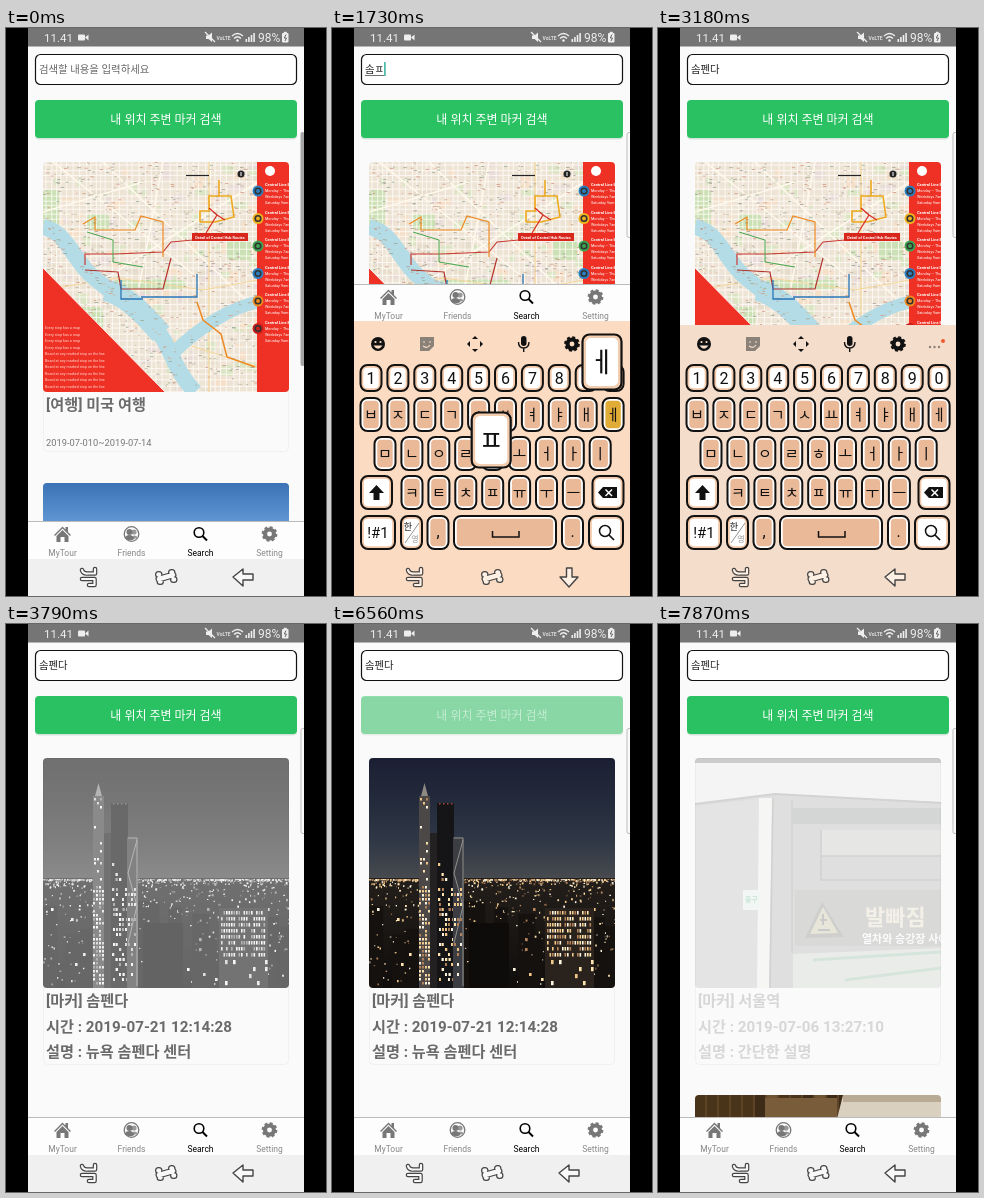
These frames come from a looping animation (320x568 px, 8000 ms). An HTML page with a canvas:

```html
<!DOCTYPE html>
<html lang="ko">
<head>
<meta charset="utf-8">
<title>Marker search</title>
<style>
html, body { margin: 0; width: 100%; height: 100%; overflow: hidden; background: #000; }
canvas { display: block; }
</style>
</head>
<body>
<canvas id="stage" width="320" height="568"></canvas>
<script>
const screenCtx = document.getElementById('stage').getContext('2d');
const FONT = 'Roboto, "Noto Sans CJK KR", "Noto Sans CJK", sans-serif';
const PAGE = '#fafafa', GREEN = '#2ac162', PEACH = '#fbdcc3', TAN = '#e9b998';
const PLACE = '솜펜다';
let g = screenCtx;

const STEPS = [0, 420, 530, 640, 740, 840, 950, 1210, 1310, 1420, 1520, 1620, 1730, 1850, 1950,
  2050, 2150, 2260, 2600, 2780, 3070, 3180, 3290, 3390, 3490, 3590, 3690, 3790, 3890, 3990,
  4600, 6560, 6660, 6760, 6860, 7370, 7470, 7570, 7670, 7770, 7870];

// Time, key pressed, text already in the field
const TYPING = [[1210, 'ㅅ', ''], [1310, 'ㅗ', 'ㅅ'], [1420, '', '소'], [1520, 'ㅁ', '소'],
  [1620, 'ㅍ', '솜'], [1730, 'ㅔ', '솜ㅍ'], [1850, '', '솜페'], [1950, 'ㄴ', '솜페'],
  [2050, 'ㄷ', '솜펜'], [2150, 'ㅏ', '솜펜ㄷ'], [2260, '', PLACE]];

// Value of the last [time, value] pair that has begun
const at = (t, pairs) => pairs.filter(p => p[0] <= t).pop()[1];

function seeded(seed) {
  return () => (seed = (seed * 16807) % 2147483647) / 2147483647;
}
function roundPath(x, y, w, h, r) {
  g.beginPath();
  g.roundRect(x, y, w, h, r);
}
function box(x, y, w, h, color, r = 0) {
  roundPath(x, y, w, h, r);
  g.fillStyle = color;
  g.fill();
}
function frame(x, y, w, h, color, r = 0, width = 1) {
  roundPath(x, y, w, h, r);
  g.strokeStyle = color;
  g.lineWidth = width;
  g.stroke();
}
function disc(x, y, r, color) {
  g.beginPath();
  g.arc(x, y, r, 0, 7);
  g.fillStyle = color;
  g.fill();
}
function ring(x, y, r, color, width, dash = []) {
  g.beginPath();
  g.arc(x, y, r, 0, 2 * Math.PI);
  g.strokeStyle = color;
  g.lineWidth = width;
  g.setLineDash(dash);
  g.stroke();
  g.setLineDash([]);
}
function fill(d, color) {
  g.fillStyle = color;
  g.fill(new Path2D(d));
}
function line(d, color, width = 1) {
  g.strokeStyle = color;
  g.lineWidth = width;
  g.stroke(new Path2D(d));
}
function label(text, x, y, size, color, align = 'left', weight = 400) {
  g.font = `${weight} ${size}px ${FONT}`;
  g.textAlign = align;
  g.fillStyle = color;
  g.fillText(text, x, y);
}
function gradient(h, ...colors) {
  const shade = g.createLinearGradient(0, 0, 0, h);
  colors.forEach((color, i) => shade.addColorStop(i / (colors.length - 1), color));
  return shade;
}
function gear(x, y, r, color) {
  ring(x, y, r * .6, color, r * .55);
  ring(x, y, r * .88, color, r * .34, [r * .38, r * .311]);
}

function photo(paint) {
  const canvas = document.createElement('canvas');
  canvas.width = 246;
  canvas.height = 230;
  g = canvas.getContext('2d');
  paint(seeded(77));
  g = screenCtx;
  return canvas;
}

const cityMap = photo(rnd => {
  box(0, 0, 246, 230, '#eee4d6');
  for (let i = 0; i < 220; i++)
    box(rnd() * 215, rnd() * 230, 4 + rnd() * 10, 3 + rnd() * 8,
      ['#e6dccb', '#f5dfc8', '#dbe5c4', '#e9dcd8'][i % 4]);
  for (const [x, y, w, h] of [[0, 28, 16, 36], [44, 52, 22, 16], [70, 118, 72, 9], [184, 78, 24, 20], [20, 145, 40, 30]])
    box(x, y, w, h, '#cbe0b4', 4);
  for (let x = 3; x < 215; x += 4 + rnd() * 4) line(`M${x} 0V230`, '#fffdf8', .8);
  for (let y = 3; y < 230; y += 4 + rnd() * 4) line(`M0 ${y}H215`, '#fffdf8', .8);
  line('M10 0L150 112M215 20L60 118M60 0L215 150M0 50L100 20M120 0L95 130', '#fff8ec', 1.6);
  line('M0 128L75 116L160 128L215 118M166 0V230M120 175L215 205', '#f6d79b', 1.2);
  line('M0 65C24 70 30 98 50 115S82 138 106 160S126 202 152 230', '#b4dce6', 16);
  line('M62 128C80 132 96 146 118 172', '#b4dce6', 22);
  line('M215 140C190 145 158 163 128 193', '#b4dce6', 13);
  line('M82 138L98 150', '#b4dce6', 10);
  for (let i = 0; i < 700; i++)
    box(rnd() * 212, rnd() * 225, 1 + rnd() * 3, .8, ['#aca296', '#d49a86', '#98aa94', '#c9bba6'][i % 4]);
  line('M42 103V92H72L120 90L128 80L150 78', '#c83a32', 1.2);
  line('M42 108L75 110L78 127H120L128 96', '#b2322c', 1.2);
  line('M40 62L52 55V68H92L98 54L120 60V95', '#ef8a22', 1.2);
  line('M98 135H154V112M78 118V137H100', '#2876b8', 1.3);
  line('M44 70L70 78V100L100 105', '#45a64b', 1);
  line('M154 140L160 158L178 172L184 195L212 205', '#ef8a22', 1.5);
  line('M157 60V49H166V34H176V18M176 34H188L191 55L172 60L157 60', '#eea91d', 1.6);
  line('M163 71L174 53L166 46M174 53L182 58', '#d72e25', 1.3);
  box(149, 71, 56, 8, '#d9261d');
  label('Detail of Central Hub Routes', 177, 76.6, 3.9, '#fff', 'center', 700);
  line('M143 13.5H166', '#222', 1.2);
  disc(198, 12, 3.5, '#222');
  line('M198 10V14', '#fff', 1);
  fill('M0 106L122 230H0Z', '#ee3124');
  line('M0 106L122 230', '#fff', .8);
  for (let i = 0; i < 10; i++)
    label(i < 4 ? 'Every stop has a map' : 'Board at any marked stop on the line', 2, 167 + i * 6.5, 3.7, '#ffd9d3');
  box(214, 0, 32, 230, '#ee3124');
  disc(227, 9, 5, '#fff');
  ['#2b7fc0', '#efb01f', '#3ca650', '#2b7fc0', '#ef8a22', '#c9201c'].forEach((color, i) => {
    const y = 29 + i * 27.5;
    disc(215, y, 5.5, color);
    ring(215, y, 2.8, '#333', 1.6);
    label('Central Line East', 222, y - 5, 4, '#fff', 'left', 700);
    ['Monday – Thursday', 'Weekdays 7am–9pm', 'Saturday 9am–9pm'].forEach((row, k) =>
      label(row, 222, y + 1 + k * 6, 3.8, '#fff'));
  });
});

const nightCity = photo(rnd => {
  const warm = ['#ffe6b0', '#f3c98a', '#fff6e2', '#b58359', '#7a5c42'];
  const windows = (x, y, w, h, dx, dy, chance) => {
    for (let wy = y; wy < y + h; wy += dy)
      for (let wx = x; wx < x + w; wx += dx)
        if (rnd() < chance) box(wx, wy, dx * .65, dy * .6, warm[rnd() * 4 | 0]);
  };
  box(0, 0, 246, 126, gradient(126, '#1c1f33', '#232a3b', '#303846', '#4b4d50'));
  box(0, 120, 246, 110, gradient(230, '#4a423a', '#241f1b', '#100e0d'));
  for (let i = 0; i < 12; i++) box(rnd() * 240, 142 + rnd() * 50, 10 + rnd() * 22, 90, '#14110f');
  for (let i = 0; i < 850; i++) {
    const depth = rnd() ** 5;
    box(rnd() * 246, 121 + depth * 105, .8 + rnd() * 1.1, .8 + rnd() * 1.4, warm[rnd() * 5 | 0]);
  }
  windows(0, 150, 246, 75, 4, 5, .04);
  box(50, 38, 11, 192, '#4c4847');
  fill('M52 38L55.5 25L59 38Z', '#8f8984');
  windows(51, 40, 9, 90, 3, 4, .25);
  windows(50, 128, 10, 100, 3, 4, .7);
  box(61, 75, 8, 155, '#242123');
  box(68, 45, 17, 185, '#151417');
  for (let x = 70; x < 85; x += 4) box(x, 45, 1.5, 1.5, '#a34a42');
  windows(69, 105, 15, 120, 3.5, 5, .18);
  box(84, 79, 11, 151, '#3c3d43');
  line('M85 80H94V228M94 82L85 115L94 148L85 185', '#918f8c', 1);
  windows(70, 130, 24, 95, 3, 5, .3);
  box(176, 150, 49, 80, '#2a231d');
  windows(178, 153, 45, 46, 2.5, 6, .8);
  windows(178, 202, 45, 26, 4, 7, .2);
  box(100, 165, 40, 65, '#0d0c0b');
});

const platformDoor = photo(rnd => {
  box(0, 0, 246, 230, '#858a86');
  box(0, 0, 246, 6, '#3a3a3c');
  fill('M0 5H246V44L80 36L0 46Z', '#e3e3df');
  line('M0 46L80 36L246 45', '#55585a', 2);
  fill('M0 48L64 41L66 230H0Z', '#999e99');
  fill('M64 40H77L74 230H62Z', '#e8eae6');
  line('M78 40L75 230M97 42V195', '#4e5250', 1.5);
  fill('M98 50H246V66H98Z', '#5e6260');
  box(126, 72, 120, 26, '#a6aaa5');
  line('M126 72V122H246M126 98H246', '#505351', 1.6);
  box(100, 132, 146, 56, '#72756f');
  fill('M110 180L127 144L149 179Z', '#47473f');
  fill('M115 176L128 149L143 175Z', '#b1a670');
  line('M128 156V167M123 172H135M125 162H132', '#333', 2);
  label('발빠짐', 170, 167, 22, '#d8cfaa', 'left', 700);
  label('열차와 승강장 사이', 167, 185, 11, '#fff', 'left', 700);
  box(48, 132, 17, 20, '#d8eee4');
  label('출구', 50, 144, 7, '#2ca06a', 'left', 700);
  fill('M98 196L246 190V230H98Z', '#b9beb8');
  line('M118 202L246 194M150 222L246 210', '#67a27d', 3);
});

const woodRoom = photo(rnd => {
  box(0, 0, 246, 40, '#5d4427');
  for (let x = 0; x < 150; x += 12) box(x, 0, 10, 40, ['#493319', '#705333', '#3d2b17'][rnd() * 3 | 0]);
  box(70, 3, 72, 20, '#795d3b');
  fill('M148 0H246V40H138Z', '#d9d0c0');
  box(148, 0, 98, 7, '#b8aa94');
});

const blueSky = photo(() => box(0, 0, 246, 230, gradient(70, '#3b73b6', '#5b92d0', '#9cbfe2')));

function card(y, height, image, opacity, rows, textOpacity = 1) {
  frame(37.5, y + .5, 245, height, '#f0f0f0', 4);
  if (image) {
    g.save();
    roundPath(37, y, 246, 230, 4);
    g.clip();
    g.globalAlpha = opacity;
    if (opacity < .8 && image === nightCity) g.filter = 'grayscale(1)';
    g.drawImage(image, 37, y);
    g.restore();
  }
  g.globalAlpha = textOpacity;
  rows.forEach((row, i) => label(row, 40, y + 248 + i * 25.5, 15.2, '#6a6a6a', 'left', 600));
  g.globalAlpha = 1;
}

function list(t) {
  if (t < 3490) {
    card(134, 289, cityMap, 1, ['[여행] 미국 여행']);
    label('2019-07-010~2019-07-14', 40, 418, 9.3, '#777');
    card(455, 289, blueSky, 1, []);
  } else if (t < 6660) {
    const shown = at(t, [[3490, 0], [3590, .2], [3690, .4], [3790, .63], [3890, .85], [3990, 1]]);
    card(134, 306, nightCity, shown,
      ['[마커] ' + PLACE, '시간 : 2019-07-21 12:14:28', `설명 : 뉴욕 ${PLACE} 센터`]);
  } else {
    const loaded = at(t, [[0, 0], [7370, .35], [7470, .7], [7570, 1]]);
    const pressed = at(t, [[0, 1], [7770, .6], [7870, .24]]);
    card(134, 306, platformDoor, loaded * pressed,
      ['[마커] 서울역', '시간 : 2019-07-06 13:27:10', '설명 : 간단한 설명'], pressed);
    card(471, 306, woodRoom, loaded, []);
  }
}

function searchField(t) {
  box(29, 26, 262, 31, '#fff', 5);
  frame(29.5, 26.5, 261, 30, '#111', 5, 1.2);
  const value = t < 1210 ? '' : TYPING.filter(k => k[0] <= t).pop()[2];
  if (value) label(value, 33, 45, 10.4, '#222');
  else label('검색할 내용을 입력하세요', 33, 45, 10.4, '#666');
  if (t < 530 || t >= 3070) return;
  const end = 33 + (value ? g.measureText(value).width : 0);
  if (value) line(`M33 47.5H${end}`, '#333', .7);
  if (t < 2600) line(`M${end + .8} 34V48`, '#14a38b', 1.3);
}

function nearbyButton(t) {
  const grey = t >= 6860 && t < 7370;
  g.globalAlpha = at(t, [[0, 1], [4600, .2], [6560, .5], [6660, .8], [6760, 1]]);
  box(29, 73, 262, 38.5, grey ? '#c9e6d3' : '#d5e3da', 4);
  box(29, 72, 262, 38, grey ? '#757575' : GREEN, 4);
  if (g.globalAlpha > .3) label('내 위치 주변 마커 검색', 160, 96, 12, '#fff', 'center');
  g.globalAlpha = 1;
}

function tabs(y) {
  box(22, y, 276, 38, '#fdfdfd');
  box(22, y, 276, 1, '#bbb');
  ['MyTour', 'Friends', 'Search', 'Setting'].forEach((name, i) =>
    label(name, 56.5 + i * 69, y + 34.5, 8.5, i === 2 ? '#000' : '#888', 'center'));
  g.save();
  g.translate(0, y + 13);
  fill('M48 1L56.5 -7.5L59.5 -4.5V-7H62V-2L65 1L64 2L56.5 -5.5L49 2ZM50.5 2L56.5 -4L62.5 2V8H58.5V3H54.5V8H50.5Z', '#777');
  ring(125.5, 0, 7.3, '#777', 1.3);
  disc(128, -2, 2.6, '#999');
  fill('M125 5Q126 1.5 128.5 1.5T132 4Z', '#999');
  disc(123.5, -2, 3, '#777');
  fill('M118.5 4Q120 1 123.5 1T128.5 5Q123 8 118.5 4Z', '#777');
  ring(193, -1.5, 4.8, '#000', 1.6);
  line('M196.5 2L201 6.5', '#000', 2);
  gear(263.5, 0, 7.5, '#777');
  g.restore();
}

function navIcons(down, back) {
  const doodle = (d, width) => {
    line(d, '#444', width);
    line(d, back, width - 2.4);
  };
  g.lineCap = g.lineJoin = 'round';
  doodle('M76 542Q77 546 82 545.5H89V541M76 551H88.5V557H83', 4.6);
  doodle('M153 551L167 547M152.5 546.5H153M154 553.5H154.5M165.5 544.5H166M167.5 551.5H168', 7);
  const arrow = down ? 'M234.5 540H240V549H246L237 559L228 549H234.5Z' : 'M227 549L237 541V546H247V552H237V558Z';
  fill(arrow, back);
  line(arrow, '#444', 1.4);
  g.lineCap = 'butt';
  g.lineJoin = 'miter';
}

const KEYS = {};
const addRow = (chars, x, y) => [...chars].forEach((char, i) => KEYS[char] = [x + i * 26.9, y]);
addRow('1234567890', 39, 350);
addRow('ㅂㅈㄷㄱㅅㅛㅕㅑㅐㅔ', 39, 386.5);
addRow('ㅁㄴㅇㄹㅎㅗㅓㅏㅣ', 53, 425.5);
addRow('ㅋㅌㅊㅍㅠㅜㅡ', 80, 464.5);

function key(x, y, w, h, color) {
  box(x - w / 2, y - h / 2, w, h, color === '#fff' ? '#f3c8a8' : '#fff', 7);
  box(x - w / 2 + 2.8, y - h / 2 + 2.8, w - 5.6, h - 5.6, color, 4);
  frame(x - w / 2, y - h / 2, w, h, '#111', 7, 2);
}

function keyboard(t, drop) {
  const held = TYPING.filter(([time, char]) => char && time <= t && t - time < 200);
  const latest = held.length && held[held.length - 1][1];
  const base = t >= 3070 ? '#f5ddcb' : PEACH;
  g.save();
  g.translate(0, drop);
  box(22, t >= 3070 ? 297 : 293, 276, 280, base);
  disc(46, 316, 7, '#111');
  disc(43.5, 314, 1.1, base);
  disc(48.5, 314, 1.1, base);
  fill('M41.5 317.5H50.5Q46 324 41.5 317.5Z', base);
  fill('M88 309H102V318L97 323H88Z', '#8a8178');
  line('M91 314H93M97 314H99M91 318Q95 321 98 317', base, 1.2);
  for (const [dx, dy] of [[0, -1], [1, 0], [0, 1], [-1, 0]]) {
    const x = 143 + dx * 8, y = 316 + dy * 8;
    fill(`M${x} ${y}L${x - dx * 3 - dy * 3} ${y - dy * 3 + dx * 3}L${x - dx * 3 + dy * 3} ${y - dy * 3 - dx * 3}Z`, '#111');
  }
  box(189, 308, 5.5, 10, '#111', 3);
  line('M186.5 314Q186.5 320 191.7 320T197 314M191.7 320V324', '#111', 1.4);
  gear(240, 316, 7.5, '#111');
  for (let i = 0; i < 3; i++) disc(272 + i * 4.5, 319, 1.2, '#8a8178');
  disc(285, 313, 2, '#f0592b');

  for (const [char, [x, y]] of Object.entries(KEYS)) {
    const digit = /\d/.test(char);
    key(x, y, 21, digit ? 26 : 33, digit ? '#fff' : char === latest ? '#e0ac35' : TAN);
    label(char, x, y + 5.5, digit ? 16 : 15, '#111', 'center', digit ? 400 : 500);
  }
  key(44.5, 464.5, 31, 33, '#fff');
  fill('M44.5 457L52 465H47.5V472H41.5V465H37Z', '#111');
  key(276, 464.5, 31, 33, '#fff');
  fill('M266 464.5L271 459H285V470H271Z', '#111');
  line('M273.5 461.5L280 468M280 461.5L273.5 468', '#fff', 1.5);
  key(46, 504.5, 34, 33, '#fff');
  label('!#1', 46, 510, 15, '#111', 'center');
  key(79.5, 504.5, 21, 33, '#fff');
  label('한', 76, 502, 9, '#111', 'center');
  label('영', 83, 514, 8, '#999', 'center');
  line('M73 515L87 495', '#777', .8);
  key(106, 504.5, 21, 33, TAN);
  label(',', 106, 509, 16, '#111', 'center');
  key(173, 504.5, 102, 33, TAN);
  line('M160.5 503V509H187V503', '#111', 1.5);
  key(240.5, 504.5, 21, 33, TAN);
  label('.', 240.5, 509, 16, '#111', 'center');
  key(274, 504.5, 34, 33, t >= 2780 && t < 3070 ? '#e0ac35' : '#fff');
  ring(273, 503, 5.5, '#111', 1.5);
  line('M277 507L282 512', '#111', 1.7);

  for (const [, char] of held) {
    const x = Math.min(270, KEYS[char][0] - 1.5), y = KEYS[char][1] - 52.5;
    box(x - 20, y - 28, 40, 56, '#f3cdb0', 7);
    box(x - 16, y - 24, 32, 48, '#fff', 5);
    frame(x - 19.5, y - 27.5, 39, 55, '#111', 7, 2.2);
    label(char, x, y + 10, 27, '#111', 'center', 500);
  }
  g.restore();
}

function statusBar() {
  box(22, 0, 276, 18.5, '#757575');
  label('11.41', 38, 14, 11.5, '#eee');
  box(72, 6.5, 7, 6, '#eee', 1);
  fill('M79 9.5L82.5 6.5V12.5Z', '#eee');
  fill('M200 7.5H202.5L206 4.5V14L202.5 11H200Z', '#eee');
  line('M199 4L209 14', '#eee', 1.2);
  label('VoLTE', 210.5, 12, 5, '#ddd', 'left', 700);
  line('M226 8Q231.5 3 237 8M228 10.5Q231.5 7 235 10.5', '#eee', 1.3);
  disc(231.5, 12.5, 1.3, '#eee');
  for (let i = 0; i < 4; i++) box(239.5 + i * 2.6, 11 - i * 2, 1.6, 3 + i * 2, '#eee');
  label('98%', 252, 14, 12, '#eee');
  box(276, 5, 6.5, 9.5, '#eee', 1);
  box(277.8, 3.8, 3, 2, '#eee');
  line('M280 6.5L278.3 10H280.5L279 13', '#666', 1);
}

function draw(time) {
  const t = STEPS.filter(step => step <= time).pop();
  const drop = at(t, [[0, 275], [530, 190], [640, 70], [740, 0], [3290, 150], [3390, 275]]);
  const open = drop < 275;
  box(0, 0, 320, 568, '#000');
  g.save();
  g.beginPath();
  g.rect(22, 0, 276, 568);
  g.clip();
  box(22, 0, 276, 568, PAGE);
  list(t);
  searchField(t);
  nearbyButton(t);
  if (t < 530) box(294.5, 104, 4, 234, '#a5a5a5', 2);
  else frame(295, 104.5, 5, 105, '#bbb', 2);
  tabs(t >= 840 && t < 3070 ? 256 : 493);
  if (open) keyboard(t, drop);
  if (drop) box(22, 531, 276, 37, open ? PEACH : '#f0f0f0');
  navIcons(open && t < 3070, open ? '#fff0e4' : '#f8f8f8');
  statusBar();
  g.restore();
}

function tick(now) {
  draw(now % 8000);
  requestAnimationFrame(tick);
}
draw(0);
requestAnimationFrame(tick);
</script>
</body>
</html>
```
